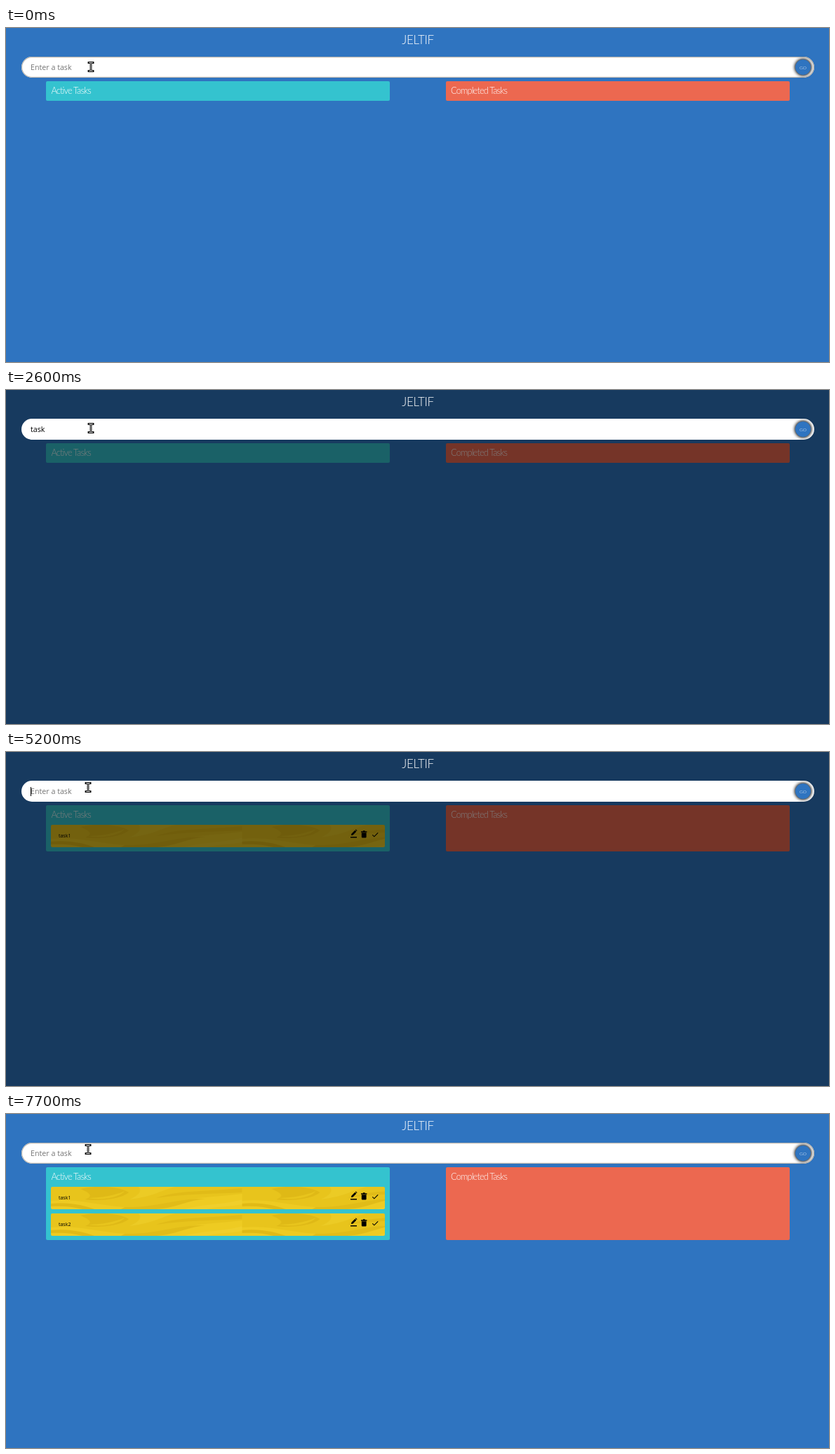
An HTML page for the animation above (8 s loop, 1173 by 477 pixels).

```html
<!DOCTYPE html>
<html lang="en">
<head>
<meta charset="utf-8">
<title>Task list</title>
<style>
  html, body { margin: 0; width: 100%; height: 100%; overflow: hidden; background: #2f74c0; }
  svg { display: block; width: 1173px; height: 477px; }
  .title { font: 300 17px Lato, sans-serif; letter-spacing: -.35px; fill: #fff; text-anchor: middle; }
  .head { font: 300 12.8px Lato, sans-serif; letter-spacing: -.85px; fill: #fff; }
  .entry { font: 10.7px "Open Sans", sans-serif; }
  .task { font: 7px "Open Sans", sans-serif; }
  .go { font: 300 6.5px Lato, sans-serif; fill: #fff; text-anchor: middle; }
  .glow { filter: drop-shadow(0 0 2.5px #000) drop-shadow(0 0 1px #0008); }
</style>
</head>
<body>
<svg viewBox="0 0 1173 477">
  <defs>
    <pattern id="waves" width="272.5" height="32" patternUnits="userSpaceOnUse">
      <path fill="#e8c41c" d="M0 0H273V32H0z"/>
      <path fill="#eecb22" d="M0 20C30 17 55 23 85 27S150 30 180 22S240 14 273 10V32H0z"/>
      <path fill="#dfb916" d="M42 3C65 -3 100 0 111 8C101 17 70 21 49 18C62 13 54 8 42 3z"/>
      <path fill="#e8c41c" d="M52 16C70 16 93 12 105 6C99 15 72 20 52 16z"/>
      <path fill="#eccb25" d="M125 0H178C158 4 150 13 112 18C126 12 130 6 125 0z"/>
      <path fill="#e1bb17" d="M150 16C180 5 215 7 273 2V8C235 10 190 10 150 16z"/>
      <path fill="#e0ba16" d="M0 24C24 21 50 27 62 32H45C30 28 18 27 0 28z"/>
      <path fill="#e1bc18" d="M105 29C150 30 180 16 220 17C188 21 175 32 145 32H100z"/>
      <path fill="#f0cf2b" d="M190 32C215 24 245 26 273 18V25C250 29 235 28 222 32z"/>
    </pattern>
    <g id="card">
      <rect width="476" height="32" rx="2" fill="url(#waves)"/>
      <path d="M428 15l.4-2.2 5-5 1.9 1.9-5 5zM433.9 7.2l.8-.7 1.9 1.8-.8.8zM427 17h9v1.6h-9z"/>
      <path d="M442 9.3h2.4l.7-1h2.2l.7 1h2.4v1.4H442zM442.8 11.2h6.8v6.1q0 1.2-1.2 1.2h-4.4q-1.2 0-1.2-1.2z"/>
      <path d="M458.3 14.3l2.5 2.5 5.4-5.5" fill="none" stroke="#000" stroke-width="1.1"/>
    </g>
  </defs>

  <path fill="#2f74c0" d="M0 0H1173V477H0z"/>
  <rect class="panel" x="57" y="76" width="490" rx="2" fill="#34c3cf"/>
  <rect class="panel" x="627" y="76" width="490" rx="2" fill="#ec6850"/>
  <text class="head" x="64.5" y="93.5">Active Tasks</text>
  <text class="head" x="634" y="93.5">Completed Tasks</text>
  <g class="item" transform="translate(64 104)"><use href="#card"/><text class="task" x="11" y="18">task1</text></g>
  <g class="item" transform="translate(64 142)"><use href="#card"/><text class="task" x="11" y="18">task2</text></g>
  <path id="shade" fill="#000" fill-opacity=".5" d="M0 0H1173V477H0z"/>

  <text class="title" x="587" y="22.5">JELTIF</text>
  <rect x="22" y="41" width="1130" height="30" rx="15" fill="#fff"/>
  <rect id="border" x="22.6" y="41.6" width="1128.8" height="28.8" rx="14.4" fill="none" stroke="#bdb9b2" stroke-width="1.2"/>
  <circle class="glow" cx="1136" cy="56" r="11" fill="#2f74c0"/>
  <text class="go" x="1136" y="58.5">GO</text>
  <text id="entry" class="entry" x="35" y="60"></text>
  <path id="caret" d="M0 50h1v13h-1z"/>
  <g id="pointer" fill="none">
    <path d="M1 1.5h6M4 1.5v12M1 13.5h6" stroke="#000" stroke-width="2.8" stroke-linecap="square"/>
    <path d="M1 1.5h6M4 1.5v12M1 13.5h6" stroke="#fff" stroke-width=".8"/>
  </g>
</svg>
<script>
  const LOOP = 8000;
  const HINT = 'Enter a task';
  const CARET_X = [35, 39, 45, 50, 56, 62];

  // Each step lists only what changes; the rest carries over.
  const changes = [
    { at: 0, focus: false, text: '', caret: false, items: 0, x: 117, y: 48 },
    { at: 100, focus: true, caret: true },
    { at: 300, y: 47 },
    { at: 1300, text: 't' },
    { at: 1700, text: 'ta' },
    { at: 1900, text: 'tas' },
    { at: 2400, text: 'task' },
    { at: 2600, caret: false },
    { at: 2900, text: 'task1', caret: true },
    { at: 3800, caret: false },
    { at: 4000, focus: false, text: '', items: 1 },
    { at: 4400, y: 43 },
    { at: 5200, focus: true, caret: true, x: 113 },
    { at: 6200, text: 't' },
    { at: 6400, text: 'ta', caret: false },
    { at: 6600, text: 'tas', caret: true },
    { at: 6800, text: 'task' },
    { at: 7600, text: 'task2', caret: false },
    { at: 7700, focus: false, text: '', items: 2 }
  ];
  let last = {};
  const steps = changes.map(change => last = { ...last, ...change });

  const byId = id => document.getElementById(id);
  const [shade, border, entry, caret, pointer] =
    ['shade', 'border', 'entry', 'caret', 'pointer'].map(byId);
  const panels = document.querySelectorAll('.panel');
  const items = document.querySelectorAll('.item');
  const show = (el, on) => el.setAttribute('visibility', on ? 'visible' : 'hidden');

  function render(step) {
    show(shade, step.focus);
    show(border, !step.focus);
    show(caret, step.caret);
    caret.setAttribute('transform', `translate(${CARET_X[step.text.length]} 0)`);
    entry.textContent = step.text || HINT;
    entry.setAttribute('fill', step.text ? '#000' : '#757575');
    pointer.setAttribute('transform', `translate(${step.x} ${step.y})`);
    panels.forEach(panel => panel.setAttribute('height', 28 + 38 * step.items));
    items.forEach((item, i) => show(item, i < step.items));
  }

  let current;
  function tick() {
    const time = performance.now() % LOOP;
    const step = steps.findLast(s => s.at <= time);
    if (step !== current) render(current = step);
    requestAnimationFrame(tick);
  }
  tick();
</script>
</body>
</html>
```
